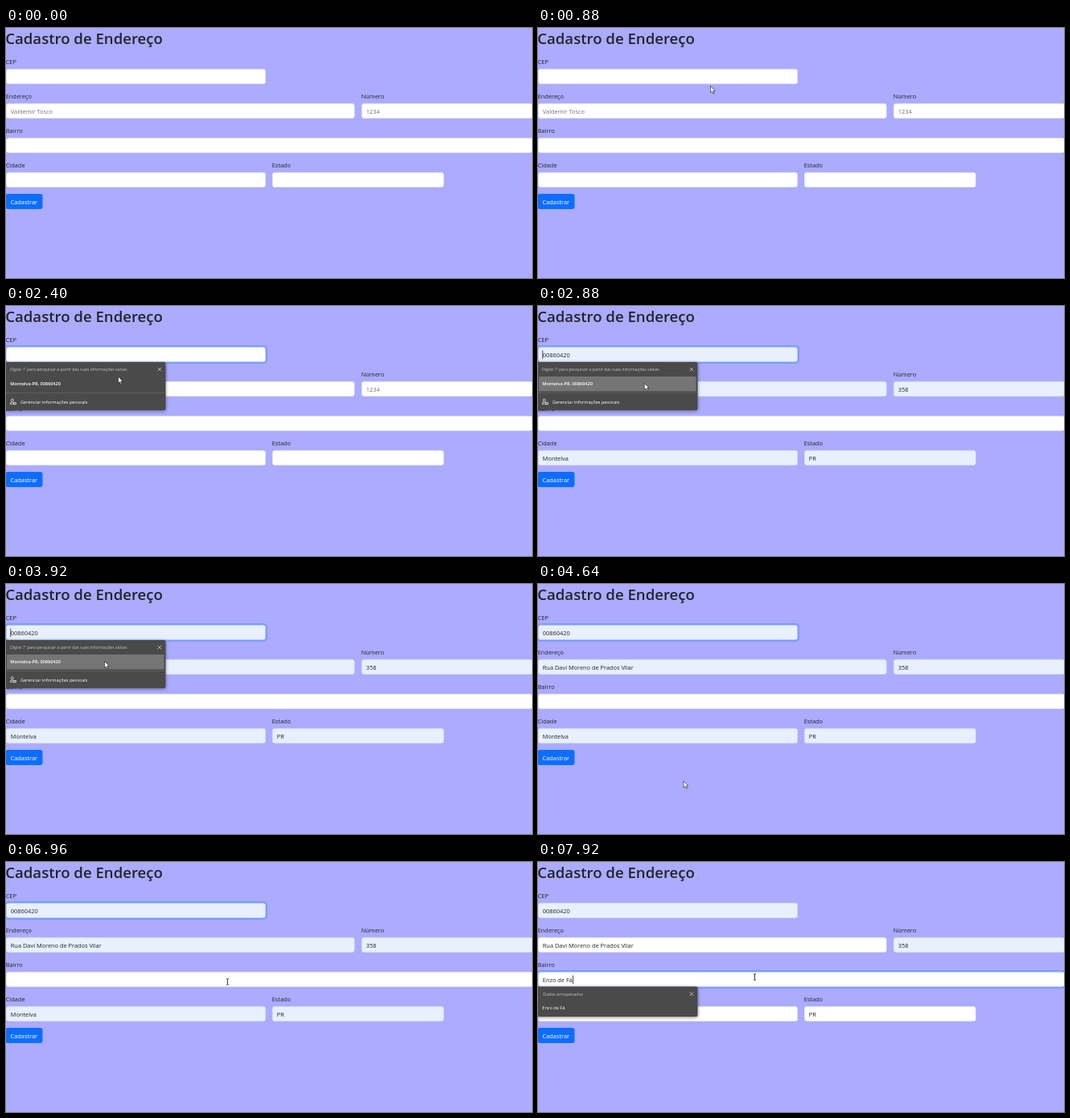
Write an HTML page that moves like this. It is 654 px wide and 312 px high and loops after 8000 ms.

```html
<!DOCTYPE html>
<html lang="pt-BR">
<head>
<meta charset="utf-8">
<title>Cadastro de Endereço</title>
<style>
  html, body { margin: 0; width: 100%; height: 100%; overflow: hidden; background: #ababff; }
  svg { display: block; width: 654px; height: 312px; }
  text { font-family: "Open Sans", "Noto Sans", sans-serif; font-size: 7.4px; fill: #212529; white-space: pre; }
  .title { font-size: 18.6px; font-weight: 600; }
  .menu { filter: drop-shadow(0 1.5px 2px rgba(0, 0, 0, .45)); }
  .menu text { font-size: 5.6px; fill: #fff; }
  .menu .hint { font-size: 5.2px; fill: #c4c4c4; }
  .menu .bold { font-weight: 600; }
</style>
</head>
<body>
<svg id="stage" viewBox="0 0 654 312"></svg>
<script>
const LOOP = 8000, STEP = 80, BLINK = 500;
const CEP_CLICK = 1520, CEP_MENU = 1600, PREVIEW = 2560, PICK = 4080;
const BAIRRO_CLICK = 7440, BAIRRO_MENU = 7520, LOOKUP = 7680;

const DATA = {
  cep: '00860420', street: 'Rua Davi Moreno de Prados Vilar',
  number: '358', area: 'Enzo de Fá', city: 'Montelva', state: 'PR'
};

// time, x, y
const PATH = [
  [80, 318, 150], [880, 214.5, 72.5], [1440, 152, 61], [1840, 150, 62],
  [2400, 139.5, 88], [2640, 134, 96], [3440, 126, 98], [3920, 122.5, 96.5],
  [4080, 122.5, 96.5], [4400, 162, 195], [4640, 181, 246], [4880, 184, 256],
  [5280, 156, 204], [6160, 150, 172], [6800, 278, 151], [6960, 275.5, 149.5],
  [7440, 271, 145], [7920, 269.5, 143.5]
];

const svg = document.getElementById('stage');

function add(tag, attrs, parent = svg, text) {
  const el = document.createElementNS('http://www.w3.org/2000/svg', tag);
  for (const k in attrs) el.setAttribute(k, attrs[k]);
  if (text) el.textContent = text;
  parent.appendChild(el);
  return el;
}
const write = (x, y, text, cls = '', parent = svg) => add('text', { x, y, class: cls }, parent, text);
const show = (el, on) => el.setAttribute('visibility', on ? 'visible' : 'hidden');

function field(label, x, y, w, hint = '') {
  write(x - 0.3, y - 6, label);
  const ring = add('rect', { x: x - 2, y: y - 2, width: w + 4, height: 23, rx: 5, fill: '#0d6efd', 'fill-opacity': 0.28 });
  const box = add('rect', { x: x + 0.25, y: y + 0.25, width: w - 0.5, height: 18.5, rx: 3, 'stroke-width': 0.5 });
  const text = write(x + 5.8, y + 12.7, '');
  const caret = add('rect', { x: x + 5.5, y: y + 4.5, width: 0.7, height: 10.5, fill: '#000' });
  return {
    x, y, w,
    set(value, filled, focusAt, t, atStart) {
      const focused = focusAt !== null;
      text.textContent = value || hint;
      text.style.fill = value ? '#212529' : '#6c757d';
      box.setAttribute('fill', filled ? '#e8f0fe' : '#fff');
      box.setAttribute('stroke', focused ? '#86b7fe' : '#ced4da');
      show(ring, focused);
      show(caret, focused && Math.floor((t - focusAt) / BLINK) % 2 === 0);
      const offset = value && !atStart ? text.getComputedTextLength() + 0.5 : -0.3;
      caret.setAttribute('x', x + 5.8 + offset);
    }
  };
}

function menu(y, h, hint, hintX) {
  const g = add('g', { class: 'menu' });
  add('rect', { x: -2, y, width: 200.5, height: h, rx: 2, fill: '#4a4a4a' }, g);
  write(hintX, y + 11, hint, 'hint', g);
  add('path', { d: `M188.6 ${y + 6.8}l4.6 4.6m0 -4.6l-4.6 4.6`, stroke: '#ddd', 'stroke-width': 0.7 }, g);
  return { g, y, h };
}

write(-0.8, 19.5, 'Cadastro de Endereço', 'title');
const cep = field('CEP', 0, 51, 323);
const street = field('Endereço', 0, 94, 433.5, 'Valdemir Tosco');
const number = field('Número', 442, 94, 213, '1234');
const area = field('Bairro', 0, 137, 655);
const city = field('Cidade', 0, 180, 323);
const state = field('Estado', 331, 180, 213.5);
const fields = [cep, street, number, area, city, state];

add('rect', { x: -0.5, y: 207, width: 46, height: 19, rx: 3, fill: '#0d6efd' });
write(5.5, 219.5, 'Cadastrar').style.fill = '#fff';

const cepMenu = menu(70, 60, "Digite '/' para pesquisar a partir das suas informações salvas", 5);
const hover = add('rect', { x: 1, y: 88, width: 195.5, height: 18.5, fill: '#757575' }, cepMenu.g);
write(5.3, 99, `${DATA.city}-${DATA.state}, ${DATA.cep}`, 'bold', cepMenu.g);
add('rect', { x: 0, y: 108, width: 198.5, height: 0.6, fill: '#6b6b6b' }, cepMenu.g);
const icon = add('g', { fill: 'none', stroke: '#fff', 'stroke-width': 0.7 }, cepMenu.g);
add('circle', { cx: 7.8, cy: 117.6, r: 1.6 }, icon);
add('path', { d: 'M8.5 122.4H5.4v-1.2q0 -.9 1 -.9h2.2' }, icon);
add('rect', { x: 9.4, y: 120.4, width: 2.8, height: 2.4 }, icon);
write(18, 122, 'Gerenciar informações pessoais', '', cepMenu.g);

const areaMenu = menu(155.5, 37.5, 'Dados armazenados', 6.3);
write(5.3, 184, DATA.area, '', areaMenu.g);

const arrow = add('path', {
  d: 'M0 0V8.2L1.9 6.5L3.2 9.4L4.5 8.8L3.2 6H5.7Z',
  fill: '#fff', stroke: '#111', 'stroke-width': 0.6, 'stroke-linejoin': 'round'
});
const beam = add('path', {
  d: 'M-1.6 -3.7H-.4L0 -3.3L.4 -3.7H1.6M0 -3.3V3.3M-1.6 3.7H-.4L0 3.3L.4 3.7H1.6',
  fill: 'none', stroke: '#111', 'stroke-width': 0.8
});

function pointer(t) {
  const i = PATH.findIndex(p => p[0] > t);
  if (i < 0) return PATH[PATH.length - 1].slice(1);
  const [t0, x0, y0] = PATH[i - 1], [t1, x1, y1] = PATH[i];
  const u = (t - t0) / (t1 - t0), e = u * u * (3 - 2 * u);
  return [x0 + (x1 - x0) * e, y0 + (y1 - y0) * e];
}

function drawPointer(t, menuOpen) {
  const on = t >= PATH[0][0];
  show(arrow, false);
  show(beam, false);
  if (!on) return;
  const [x, y] = pointer(t);
  const m = menuOpen;
  const inMenu = m && x < 198 && y >= m.y && y <= m.y + m.h;
  const inField = fields.some(f => x >= f.x && x <= f.x + f.w && y >= f.y && y <= f.y + 19);
  const shape = inField && !inMenu ? beam : arrow;
  shape.setAttribute('transform', `translate(${x} ${y})`);
  show(shape, true);
}

function draw(t) {
  const filled = t >= PREVIEW, looked = t >= LOOKUP;
  const value = k => filled ? DATA[k] : '';
  const onCep = t >= CEP_CLICK && t < BAIRRO_CLICK;
  const cepFocus = onCep ? (t < PICK ? CEP_CLICK : PICK) : null;

  cep.set(value('cep'), filled, cepFocus, t, t < PICK);
  street.set(value('street'), filled && !looked, null, t);
  number.set(value('number'), filled, null, t);
  area.set(looked ? DATA.area : '', false, t >= BAIRRO_CLICK ? BAIRRO_CLICK : null, t);
  city.set(value('city'), filled && !looked, null, t);
  state.set(value('state'), filled && !looked, null, t);

  const cepOpen = t >= CEP_MENU && t < PICK, areaOpen = t >= BAIRRO_MENU;
  cepMenu.g.style.display = cepOpen ? '' : 'none';
  areaMenu.g.style.display = areaOpen ? '' : 'none';
  show(hover, cepOpen && filled);
  drawPointer(t, cepOpen ? cepMenu : areaOpen ? areaMenu : null);
}

const start = performance.now();
function tick() {
  const t = (performance.now() - start) % LOOP;
  draw(Math.floor(t / STEP) * STEP);
  requestAnimationFrame(tick);
}
tick();
</script>
</body>
</html>
```
